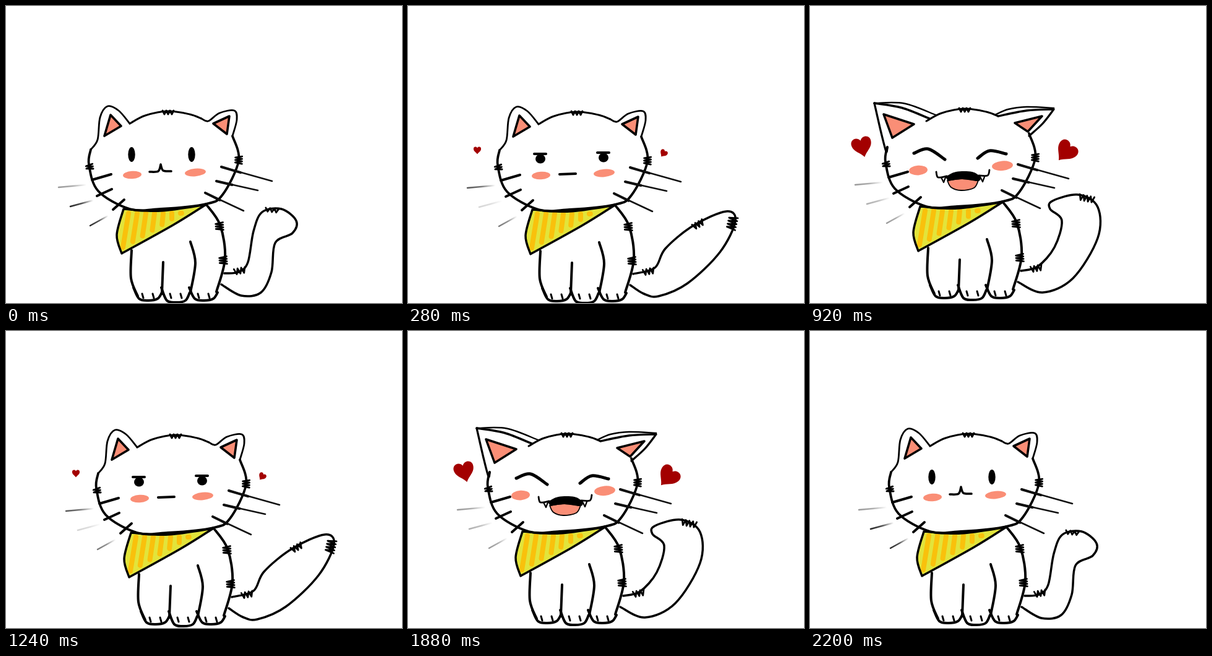
An HTML page with a canvas that plays this animation: 640x480 px, repeating every 2240 ms.

```html
<!DOCTYPE html>
<html lang="en">
<head>
<meta charset="utf-8">
<title>Cat moods</title>
<style>
html, body { margin: 0; width: 100%; height: 100%; overflow: hidden; background: #fff; }
canvas { display: block; }
</style>
</head>
<body>
<canvas id="stage" width="640" height="480"></canvas>
<script>
const ctx = document.getElementById('stage').getContext('2d');
const INK = '#000', PINK = '#fa8e76', RED = '#a30000', YELLOW = '#e2e43b', ORANGE = '#f9c10c';
const LOOP = 2240;

// Smooth curve through "x,y x,y ..."; a slash marks a sharp corner.
function trace(text) {
  ctx.beginPath();
  let last = null;
  for (const part of text.split('/')) {
    const pts = part.trim().split(/\s+/).map(p => p.split(',').map(Number));
    if (last) pts.unshift(last);
    else ctx.moveTo(...pts[0]);
    for (let i = 0; i < pts.length - 1; i++) {
      const b = pts[i], c = pts[i + 1], a = pts[i - 1] || b, d = pts[i + 2] || c;
      ctx.bezierCurveTo(b[0] + (c[0] - a[0]) / 6, b[1] + (c[1] - a[1]) / 6,
        c[0] - (d[0] - b[0]) / 6, c[1] - (d[1] - b[1]) / 6, c[0], c[1]);
    }
    last = pts[pts.length - 1];
  }
}

function stroke(width, color = INK) {
  ctx.lineWidth = width;
  ctx.strokeStyle = color;
  ctx.stroke();
}

function line(text, width = 4, color = INK) {
  trace(text);
  stroke(width, color);
}

function shape(text, fill, width = 0) {
  trace(text);
  ctx.closePath();
  ctx.fillStyle = fill;
  ctx.fill();
  if (width) stroke(width);
}

function oval(x, y, rx, ry = rx, fill = INK, turn = 0) {
  ctx.beginPath();
  ctx.ellipse(x, y, rx, ry, turn, 0, 7);
  ctx.fillStyle = fill;
  ctx.fill();
}

function at(x, y, turn, draw) {
  ctx.save();
  ctx.translate(x, y);
  ctx.rotate(turn);
  draw();
  ctx.restore();
}

// Zigzag of fur.
function tuft(x, y, turn, high = 9, gap = 6, n = 3) {
  at(x, y, turn, () => {
    ctx.beginPath();
    for (let i = 0; i <= n * 2; i++) ctx.lineTo((i / 2 - n / 2) * gap, (i % 2 - 0.5) * high);
    stroke(2.8);
  });
}

function heart(x, y, size, turn) {
  at(x, y, turn, () => {
    ctx.scale(size, size);
    ctx.beginPath();
    for (const side of [-1, 1]) {
      ctx.moveTo(0, -0.6);
      ctx.bezierCurveTo(side * 0.3, -1.15, side * 1.15, -0.95, side, -0.2);
      ctx.bezierCurveTo(side * 0.9, 0.35, side * 0.3, 0.6, 0, 1.1);
    }
    ctx.fillStyle = RED;
    ctx.fill();
  });
}

function hearts() {
  heart(96, 231, 16, -0.25);
  heart(426, 239, 17, 0.7);
}

function cheeks(spread = 0, ry = 6.2) {
  oval(204 - spread, 273 - spread * 0.2, 15, ry, PINK, -0.07);
  oval(306 + spread, 269 - spread * 0.4, 17, ry, PINK, -0.09);
}

function innerEar(a, b, c) {
  shape([a, b, c].join(' / '), PINK, 3.6);
}

function roundEars() {
  line('137,232 148,216 152,180 164,162 182,169 200,190', 2.8);
  line('316,182 327,186 345,173 369,169 373,184 366,210', 2.8);
  innerEar('169,176', '186,194', '159,210');
  innerEar('361,178', '335,190', '357,207');
}

function perkedEars(x, y, side) {
  const tip = `${x},${y}`, midX = (x + 205) / 2, midY = (y + 186) / 2;
  line(`137,232 ${side} ${tip}`, 3.3);
  line(`${tip} ${midX},${midY - 5} 205,186`, 3.6);
  line(`${tip} ${midX + 4},${midY - 12} 215,180`, 2.4);
  line('311,180 332,171 362,167 406,169', 2.6);
  line('316,182 362,173 406,171 / 388,194 366,214', 3.3);
  innerEar('387,182', '343,193', '364,207');
}

function tail(points) {
  line(`348,450 ${points} 353,432`, 3.5);
}

function fang(x, y) {
  line(`${x - 4},${y} / ${x},${y + 8} / ${x + 3},${y}`, 2.2);
}

function sleepyEye(x, y) {
  oval(x, y, 8, 7.5);
  line(`${x - 10},${y - 8} ${x + 9},${y - 8}`);
}

function sparkEye(x, y, side) {
  oval(x, y, 15.5);
  ctx.beginPath();
  for (let i = 0; i < 8; i++) {
    const r = i % 2 ? 4.2 : 8, a = i * Math.PI / 4;
    ctx.lineTo(x + side * 4 + r * Math.cos(a), y - 4 + r * Math.sin(a));
  }
  ctx.fillStyle = '#fff';
  ctx.fill();
  oval(x - side * 7, y + 7, 2.8, 2.8, '#fff');
  line(`${x - side * 8},${y - 22} ${x + side * 17},${y - 14}`, 5);
}

// "faint" holds the strength of the three loose whiskers on the left.
const moods = {
  calm: {
    faint: [0.45, 0.95, 0.95],
    draw() {
      roundEars();
      cheeks();
      for (const x of [203, 300]) oval(x, 240, 5.7, 11.9);
      line('232,268 246,267 250,256 / 254,266 267,267', 3.5);
      tail('380,468 412,463 429,430 435,383 463,367 469,347 445,328 414,333 400,364 391,414 376,430');
      tuft(430, 330, 0.1, 6, 7);
    }
  },
  sulk: {
    faint: [0.75, 0.18, 0.6],
    draw() {
      roundEars();
      cheeks();
      sleepyEye(203, 246);
      sleepyEye(305, 244);
      line('234,271 260,270');
      tail('370,464 394,468 441,447 493,397 518,347 503,331 450,354 405,391 388,422');
      tuft(513, 350, 1.8, 14, 5, 4);
      tuft(458, 352, -0.5);
      heart(101, 232, 6, 0);
      heart(402, 237, 6, 0.6);
    }
  },
  fierce: {
    faint: [0.3, 0, 0.4],
    draw() {
      perkedEars(156, 149, '146,217 141,201 145,168');
      innerEar('153,170', '190,190', '159,208');
      cheeks();
      sparkEye(202, 241, 1);
      sparkEye(304, 241, -1);
      line('232,267 245,265 250,256 / 255,265 266,267', 3.5);
      fang(237, 268);
      fang(262, 268);
      tail('388,468 442,439 467,375 457,334 436,328 415,344 409,385 387,423');
      tuft(459, 344, 1.2, 10, 5, 4);
      hearts();
    }
  },
  joy: {
    faint: [0.45, 0.35, 0.45],
    draw() {
      perkedEars(116, 161, '135,239 127,209');
      innerEar('131,179', '180,195', '145,217');
      cheeks(17, 7.8);
      line('180,242 203,235 230,252', 5);
      line('283,250 302,238 329,243', 5);
      line('216,272 219,281 233,279', 2.8);
      line('302,269 299,278 285,278', 2.8);
      fang(228, 281);
      fang(291, 280);
      shape('234,286 258,283 284,286 / 277,298 256,302 240,297 234,286', PINK, 1.8);
      shape('231,280 248,272 274,272 288,280 / 284,287 258,284 235,287 / 231,280', INK);
      tail('388,467 437,444 477,379 477,329 446,309 404,319 400,332 419,351 407,394 380,425');
      tuft(459, 315, 0.2, 9, 6, 4);
      hearts();
    }
  }
};

function body() {
  line('203,395 202,440 213,469');
  line('254,414 252,465');
  line('298,381 306,415 298,463');
  line('340,462 354,408 346,354 323,320');
  for (let i = 0; i < 3; i++) {
    const x = 206 + 45 * i, floor = 476 + i % 2 * 3;
    line(`${x},455 ${x + 9},${floor - 3} ${x + 24},${floor} ${x + 39},${floor - 3} ${x + 46},463`);
    for (const toe of [14, 31]) line(`${x + toe},465 ${x + toe + 2},472`, 3);
  }
  tuft(345, 356, 1.5, 12, 4);
  tuft(351, 411, 1.5, 12, 4);
  tuft(378, 428, -0.2);
}

function scarf() {
  const edge = '190,328 250,331 323,321 / 270,354 187,400 / 179,370 190,328';
  shape(edge, YELLOW);
  for (let i = 0; i < 7; i++) {
    const top = 198 + 14 * i, foot = top - 9 + 1.8 * i, hem = 400 - (foot - 187) * 0.58;
    line(`${top},335 ${foot},${hem - 9}`, 8, ORANGE);
  }
  line(edge, 3.5);
}

function head() {
  line('200,190 225,177 262,170 297,175 316,182', 3);
  line('366,210 376,250 350,305 323,320 250,328 200,328 149,299 134,256 137,232', 3.8);
  tuft(262, 172, 0, 6);
  tuft(135, 260, 1.4, 11, 4, 2);
  tuft(376, 249, 1.6, 11, 4);
}

function whiskers(faint) {
  line('139,281 170,272');
  line('147,307 171,296');
  line('173,329 191,313');
  for (const [x, y, dx, dy] of [[348, 260, 82, 23], [340, 283, 67, 15], [322, 302, 62, 29]]) {
    line(`${x},${y} ${x + dx * 0.38},${y + dy * 0.4}`);
    line(`${x},${y} ${x + dx},${y + dy}`, 2.6, '#111');
  }
  faint.forEach((alpha, i) => {
    const x = [85, 104, 136][i], y = 293 + 31 * i, dx = 45 - 8 * i, dy = -4 - 6 * i;
    const g = ctx.createLinearGradient(x, y, x + dx, y + dy);
    g.addColorStop(0, `rgba(30,30,30,${alpha})`);
    g.addColorStop(0.5, `rgba(30,30,30,${alpha * 0.8})`);
    g.addColorStop(1, 'rgba(30,30,30,0)');
    line(`${x},${y} ${x + dx},${y + dy}`, 2.5, g);
  });
}

// Start time, mood, offset of the cat.
const schedule = [
  [0, 'calm', 0, 0],
  [280, 'sulk', 11, 1],
  [600, 'fierce', -7, 1],
  [920, 'joy', -12, -4],
  [1240, 'sulk', 12, -2],
  [1560, 'fierce', -10, -2.5],
  [1880, 'joy', -5, -4],
  [2200, 'calm', -6, -4]
];

function render() {
  const t = performance.now() % LOOP;
  const [, name, x, y] = schedule.filter(s => s[0] <= t).pop();
  const mood = moods[name];
  ctx.setTransform(1, 0, 0, 1, 0, 0);
  ctx.fillStyle = '#fff';
  ctx.fillRect(0, 0, 640, 480);
  ctx.lineCap = ctx.lineJoin = 'round';
  ctx.translate(x, y);
  body();
  scarf();
  head();
  whiskers(mood.faint);
  mood.draw();
  requestAnimationFrame(render);
}
render();
</script>
</body>
</html>
```
